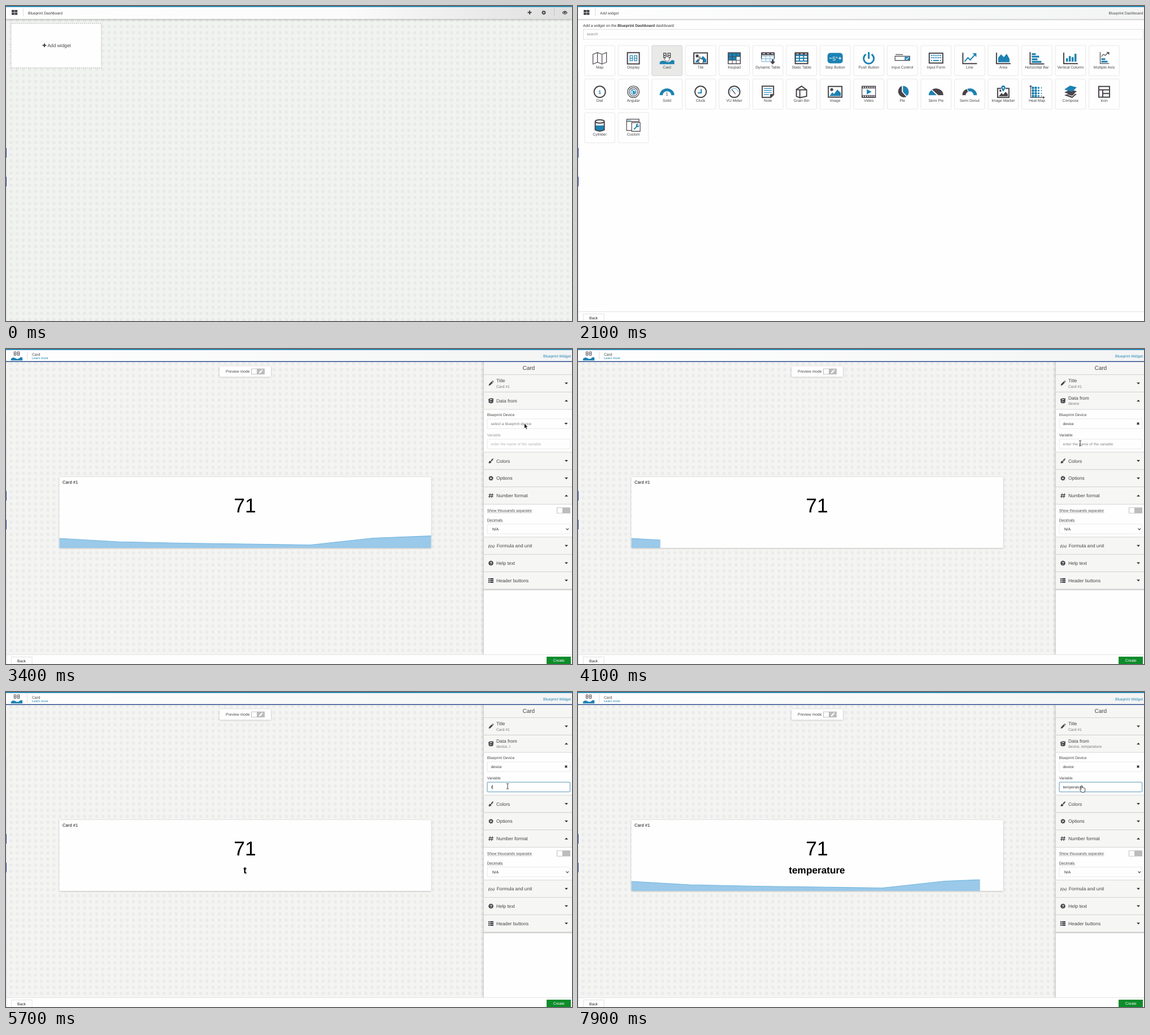
Animation of 1002x559 px, one loop 8 s. Source, as an HTML page:

```html
<!DOCTYPE html>
<html lang="en">
<head>
<meta charset="utf-8">
<title>Card widget</title>
<style>
html,body{margin:0;width:100%;height:100%;overflow:hidden;background:#f1f3f1}
svg{display:block;position:absolute;left:0;top:0}
text{font-family:"Liberation Sans",Arial,sans-serif;text-rendering:geometricPrecision;white-space:pre}
.k{fill:#48434a}.b{fill:#1c82b2}.w{fill:#fff}
.l,.m,.n,.h,.v{fill:none;stroke:#48434a;stroke-width:2}
.m{stroke:#1c82b2}.n{stroke:#1c82b2;stroke-width:1.2}.h{stroke-width:1.2}
.v{stroke:#fff;stroke-width:1.2}
</style>
</head>
<body>
<svg id="stage" width="1002" height="559" viewBox="0 0 1002 559"></svg>
<script>
const stage = document.getElementById('stage');
const INK = '#444', BLUE = '#1c82b2', WHITE = '#fefefe';

const text = (x, y, s, size = 6.7, fill = INK, more = '') =>
  `<text x="${x}" y="${y}" font-size="${size}" fill="${fill}" ${more}>${s}</text>`;
const rect = (x, y, w, h, fill, more = '') =>
  `<rect x="${x}" y="${y}" width="${w}" height="${h}" fill="${fill}" ${more}/>`;
const at = (x, y, s, k = 1) => `<g transform="translate(${x} ${y}) scale(${k})">${s}</g>`;
const group = (id, s) => `<g id="${id}">${s}</g>`;
const ring = (x, y, r) => `M${x - r} ${y}a${r} ${r} 0 1 0 ${2 * r} 0a${r} ${r} 0 1 0 ${-2 * r} 0z`;
const box = (x, y, w, h) => `M${x} ${y}h${w}v${h}h${-w}z`;
const repeat = (n, f) => Array.from({length: n}, (_, i) => f(i)).join('');
// "class path|class path" to SVG paths
const shape = s => s.split('|').map(p => `<path class="${p[0]}" d="${p.slice(1)}"/>`).join('');
const middle = 'text-anchor="middle"';

const eight = (x, y, w, h) => box(x, y, w, h) + `M${x} ${y + h / 2}h${w}`;
const axes = 'lM-12-10V9.5H13|';
const wave = 'bM-13 10.500V7C-9 3-6 4-2 6S5 7 7 4.500S11 4 13 4V10.500z';
const cardIcon = shape(`h${eight(-6, -9, 4.4, 8)}${eight(1.6, -9, 4.4, 8)}|${wave}`);
const photo = `l${box(-12, -9.5, 24, 19)}|k${ring(-6, -4, 2.6)}|bM-10 7.500L-5 1l3 3 6-8 6 6v5.500z`;
const dial = `l${ring(0, 0, 10)}`;
const one = (y, fill) => text(0, y, '1', 9, fill, middle + ' font-weight="bold"');
const arrowLine = 'mM-9 6L-3-1 1 3 10-7|bM5-9h7v7z';

const icons = [
  ['Map', shape('hM-12-7L-4-10 4-7 12-10V7L4 10.500-4 7-12 10.500zM-4-10V7M4-7V10.500')],
  ['Display', shape(`l${box(-10.5, -10, 21, 20)}|n${eight(-6, -4.5, 4.5, 9)}${eight(1.7, -4.5, 4.5, 9)}`)],
  ['Card', cardIcon],
  ['Tile', shape(photo)],
  ['Keypad', shape(`k${box(-11.5, -10.5, 23, 21)}|b${repeat(6, i => box(-10 + i % 3 * 7, -9 + (i / 3 | 0) * 6.5, 6, 5.5))}|w${box(4, -2.5, 6, 5.5)}${repeat(3, i => box(-10 + i * 7, 4, 6, 5))}`)],
  ['Dynamic Table', `<g opacity=".5">${shape(`n${repeat(3, i => box(-11 + i * 7.3, -4, 7.3, 5) + box(-11 + i * 7.3, 1, 7.3, 5))}`)}</g>` +
    shape(`k${box(-12, -10.5, 24, 5)}|hM-11.500-6V1M11.500-6V1|v${repeat(3, i => `M${-9 + i * 7.5}-8h4`)}|kM7 2h3v4h3L8.500 11 4 6h3z`)],
  ['Static Table', shape(`k${box(-12, -10.5, 24, 5)}|m${repeat(3, i => box(-11 + i * 7.3, -5, 7.3, 5) + box(-11 + i * 7.3, 0, 7.3, 5))}|l${box(-11, -9, 22, 18.5)}|v${repeat(3, i => `M${-9 + i * 7.3}-7.500h4`)}`)],
  ['Step Button', rect(-13.5, -9.5, 27, 18.5, BLUE, 'rx="5"') + shape('vM-10 0h4M6 0h5M8.500-2.500v5') + text(0, 4, '5°', 10, '#fff', middle)],
  ['Push Button', '<path class="m" stroke-width="3" style="stroke-width:3" d="M-5-7A9 9 0 1 0 5-7M0-11V1"/>'],
  ['Input Control', shape(`h${box(-13, -3.5, 26, 7.5)}M-12-6.500h13|b${box(4, -2.5, 9, 6)}|vM6 .5l2 2 3-4`)],
  ['Input Form', shape(`l${box(-12, -9, 24, 17.5)}|b${repeat(12, i => box(-9 + i % 6 * 3.2, -6 + (i / 6 | 0) * 4, 2, 2))}${box(-5, 3, 10, 2)}${box(-9, 3, 2, 2)}${box(7, 3, 2, 2)}`)],
  ['Line', shape(axes + arrowLine)],
  ['Area', shape(axes + 'bM-9 7V-1L-4-7 1-2 6-8 11 1V7z')],
  ['Horizontal Bar', shape(`lM-12-11V10H13|b${repeat(4, i => box(-9, -9 + i * 4.6, [7, 13, 10, 17][i], 3.3))}`)],
  ['Vertical Column', shape(axes + `b${repeat(4, i => box(-8 + i * 5, 6 - [6, 10, 8, 14][i], 3.5, [6, 10, 8, 14][i]))}`)],
  ['Multiple Axis', shape(`hM-7-11V9.500H9|b${box(-5, 0, 7, 3)}${box(-5, 4.5, 11, 3)}|hM-5-3L-1-7 2-5 7-10|kM4-11h5v5z`)],
  ['Dial', shape(dial) + one(3.4, BLUE)],
  ['Angular', shape(`h${ring(0, 0, 10.3)}${ring(0, 0, 7.5)}|n${ring(0, 0, 4.5)}|bM-5-6L2.500 1 1 2.500z|n${ring(1, 1, 2)}`)],
  ['Solid', shape('bM-13 6A13 12 0 0 1 13 6H7.500A7.500 7 0 0 0-7.500 6z') + text(0, 7, '1', 8, '#48434a', middle)],
  ['Clock', shape(`${dial}|mM1-5V2H-5`)],
  ['VU Meter', shape(`${dial}|hM-4-4L2 4`) + '<path class="n" stroke-dasharray="1.2 1" d="M-7 1A7 7 0 0 1 7 1"/>'],
  ['Note', shape(`lM-10-10H10V5L5 10H-10z|n${repeat(4, i => `M-7 ${-6 + i * 3.6}h${i > 2 ? 9 : 14}`)}|kM4 11V4h7z`)],
  ['Grain Bin', shape('lM-9-4V8L-3 10.500V-3.500zM-3-3.500H9V8L-3 10.500M-9-4L0-10 9-3.500')],
  ['Image', shape(photo)],
  ['Video', shape(`h${box(-12, -10, 24, 20)}|k${box(-12, -10, 24, 4)}${box(-12, 6, 24, 4)}|w${repeat(12, i => box(-10.5 + i % 6 * 3.8, i < 6 ? -9 : 7, 2, 2))}|bM-3.500-4.500L5 0-3.500 4.500z`)],
  ['Pie', shape('kM-1-10.500A10.500 10.500 0 1 0 7 9L-1 0z|bM1-10.500A10.500 10.500 0 0 1 8 7.500L1 0z')],
  ['Semi Pie', shape('kM-7-4A13 12 0 0 1 13 6H4z|bM-13 6A13 12 0 0 1-8-3L1 6z')],
  ['Semi Donut', shape('kM-13 6A13 12 0 0 1-5-5L-3 0A8 7 0 0 0-7 6z|bM-4-5.500A13 12 0 0 1 13 6H7A7 7 0 0 0-2-.5z')],
  ['Image Marker', shape(`l${box(-10, -6, 20, 16)}|kM-8 8L-3 2 0 5 4 0 8 4V8z${ring(-5, -2, 2)}|w${box(-4, -8, 8, 6)}|bM0 0L-3.500-6A3.800 3.800 0 1 1 3.500-6z|w${ring(0, -7, 1.3)}`)],
  ['Heat Map', shape(`hM-11-11V10H13M-13-9l2-2 2 2M11 8l2 2-2 2|b${repeat(16, i => ring(-7 + i % 4 * 5, -7 + (i / 4 | 0) * 4.8, [2.3, 2.3, 1.7, 1][i % 4]))}`)],
  ['Compose', shape('kM-11 6L0 2 11 4 3 11zM-11 1L0-4 11-1 3 6z|wM-11 3L3 7 11 0V1L3 8.500z|bM-11-4L-1-11 11-8 3 0z')],
  ['Icon', shape(`l${box(-9.5, -9.5, 19, 19)}M-9.500-3.500H9.500M-2.500-3.500V9.500M-2.500 3H9.500`)],
  ['Cylinder', shape('bM-8 0H8V8Q0 12-8 8z|lM-8-7V8Q0 12 8 8V-7M-8-7A8 2.800 0 1 1 8-7A8 2.800 0 1 1-8-7')],
  ['Custom', shape(`hM-12-11H10V-6M-12-11V9H-3M-12-7H10|n${repeat(3, i => `M${-10.5 + i * 2.4}-9h1.300`)}|h${box(-3, -5, 15, 15.5)}|mM1 7L7 1|b${ring(7.5, 0, 2.8)}|wM7-1l3-2 1 2-3 2z`)]
];

const gear = '<circle r="2.5" class="l"/><circle r="3.7" class="l" style="stroke-width:1.500" stroke-dasharray="1.45"/>';
const plus = shape('kM-1-3.500h2v2.500h2.500v2H1v2.500h-2V1h-2.500v-2H-1z');
const pencil = 'M-4 4l.7-2.800 4.600-4.600 2.100 2.100-4.600 4.600zM2-4l1-1 2.100 2.100-1 1z';
const caret = up => `<path fill="#333" d="${up ? 'M-3 1.500h6L0-1.800z' : 'M-3-1.500h6L0 1.800z'}"/>`;
const gridIcon = shape(`k${repeat(4, i => box(10 + i % 2 * 5.4, 7 + (i >> 1) * 4.8, 4.8, 4))}`);
const shade = (x, y, w, h, id) => rect(x, y, w, h, `url(#${id})`);
const sep = (x, y = 4, h = 14) => rect(x, y, .8, h, '#d4d4d4');

const fade = (id, a, b, dir = 'x2="0" y2="1"') =>
  `<linearGradient id="${id}" ${dir}><stop stop-color="${a}"/><stop offset="1" stop-color="${b}"/></linearGradient>`;
const tile = (id, c, hi) => `<pattern id="${id}" patternUnits="userSpaceOnUse" x="3.600" y="128.600" width="10.83" height="10.83">
  ${rect(2.8, 2.8, 5.2, 5.2, c, 'rx="1.200"')}<path d="M3.500 7.300l3.600-3.600" stroke="${hi}" stroke-width=".8"/></pattern>`;

const defs = `<defs>${fade('drop', '#0003', '#0000')}${fade('side', '#0000', '#0002', '')}
${tile('tileA', '#e7e9e6', '#eceeeb')}${tile('tileB', '#e9eae9', '#eeefee')}
<linearGradient id="barA"><stop stop-color="#fefefe"/><stop offset=".6" stop-color="#fbfbfb"/><stop offset="1" stop-color="#dedfde"/></linearGradient>
${fade('barB', '#fefefe', '#f3f4f4', '')}
<filter id="lift" x="-5%" y="-20%" width="110%" height="140%"><feDropShadow dx="0" dy=".6" stdDeviation="1.600" flood-opacity=".28"/></filter></defs>`;

const footer = rect(0, 542, 1002, 17, WHITE) + rect(0, 542, 1002, .8, '#dcdcdc') +
  rect(9.5, 546.5, 36.5, 14, WHITE, 'stroke="#ddd" stroke-width=".8"') + text(20, 555.5, 'Back', 6.7, '#222');

const dashboard = rect(0, 0, 1002, 559, '#f1f3f1') + rect(0, 23, 1002, 536, 'url(#tileA)') +
  rect(0, 2, 1002, 21, 'url(#barA)') + shade(0, 23, 1002, 4, 'drop') +
  gridIcon + sep(30) + text(39, 14.5, 'Blueprint Dashboard', 6.7, '#333') +
  at(927, 11.5, plus) + at(952, 11.7, gear, .85) + rect(970, 4, .8, 14, '#bbb') +
  at(989.3, 11.8, shape(`hM-4 0Q0-5.500 4 0Q0 5.500-4 0z|k${ring(0, -.2, 1.7)}`)) +
  rect(8.7, 30.7, 160, 79, WHITE, 'stroke="#bbb" stroke-width="1.500" stroke-dasharray="1.600 1.900"') +
  at(68, 69.7, plus, .95) + text(73.5, 72.8, 'Add widget', 8.4);

const picker = rect(0, 0, 1002, 559, WHITE) + rect(0, 2, 1002, 21, 'url(#barB)') + shade(0, 23, 1002, 3.5, 'drop') +
  gridIcon + sep(30) + text(39, 14.5, 'Add widget') + text(939.5, 14.5, 'Blueprint Dashboard') +
  text(9, 36.8, 'Add a widget on the <tspan font-weight="bold">Blueprint Dashboard</tspan> dashboard:', 6.7, '#333') +
  rect(9.4, 41.5, 991, 17.5, WHITE, 'id="search" stroke="#ddd" stroke-width=".9"') + text(15.5, 52.3, 'search', 6.7, '#888') +
  icons.map(([name, art], i) => {
    const x = 11.7 + i % 16 * 59.53, y = 70 + (i / 16 | 0) * 59.6;
    return rect(x, y, 53.6, 53.6, WHITE, `rx="1.500" stroke="#e2e2e2" stroke-width=".8" id="cell${i}"`) +
      at(x + 26.8, y + 22.7, art) + text(x + 26.8, y + 40.8, name, 6.7, INK, middle);
  }).join('') + footer;

const section = (y, name, open, icon, sub = '') =>
  rect(846, y, 156, 30.8, '#f6f6f5') + rect(846, y - .4, 156, .9, '#d2d2d2') + rect(846, y + 30.4, 156, .9, '#d2d2d2') +
  at(858.5, y + 15.5, icon) + at(992, y + 15.5, caret(open)) + sub +
  (name && text(868, y + (sub ? 13.4 : 18.5), name, 8.35));
const field = (y, id) => rect(852, y, 146.6, 17.2, WHITE, `id="${id}" rx="1" stroke="#e2e2e2" stroke-width=".8"`);
const solid = d => `<path class="k" d="${d}"/>`;

const panel = shade(841, 23, 5, 519, 'side') + rect(846, 23, 156, 519, WHITE) + rect(846, 23, 156, 22.5, '#f6f6f5') +
  text(925.3, 37.4, 'Card', 10, INK, middle) +
  section(45.5, 'Title', false, solid(pencil), text(868, 68.6, 'Card #1', 6.7, '#777')) +
  section(76.3, '', true, shape('lM-3-1V2.500Q0 4.500 3 2.500V-1|kM-4.500-3L0-4.500 4.500-4 4 1 1 2-4 0z|vM-2-1.500L2-2.500')) +
  text(868, 94.5, 'Data from', 8.35, INK, 'id="dataName"') + text(868, 99.4, '', 6.7, '#777', 'id="dataSub"') +
  text(851.7, 118.5, 'Blueprint Device') + field(124, 'device') + text(858.5, 134.8, '', 6.7, '#777', 'id="deviceText"') +
  at(991.5, 132.4, `<g id="deviceCaret">${caret(false)}</g>` + '<path id="deviceClear" d="M-1.800-1.800l3.600 3.600m0-3.600l-3.600 3.600" stroke="#222" stroke-width="1.500"/>') +
  text(851.7, 154.7, 'Variable', 6.7, INK, 'id="varLabel"') + field(160, 'variable') + text(858.5, 170.8, '', 6.7, INK, 'id="varText"') +
  rect(0, 165, .8, 7.4, '#111', 'id="caret"') +
  section(183, 'Colors', false, shape('kM-4 4Q-4 0-1 0L1 2Q0 5-4 4zM-.5-.8L3.500-4.500 4.500-3.500 1.500 1z')) +
  section(213.9, 'Options', false, at(0, 0, gear, .95)) +
  section(244.7, 'Number format', true, shape('hM-1.200-4L-2.700 4M2.700-4L1.200 4M-4-1.500H4.500M-4.500 1.500H4')) +
  text(851.7, 288.7, 'Show thousands separator') + rect(851.7, 290, 80, .5, '#888') +
  rect(975, 281.2, 24, 10.5, '#bcbcbc') + rect(976, 282, 9, 8.9, WHITE) +
  text(851.7, 305.5, 'Decimals') + rect(851.7, 306.8, 28.5, .5, '#888') +
  field(310.7, 'decimals') + text(861, 321.8, 'N/A', 6.7, '#222') + '<path class="h" d="M991.500 318.300l2.300 2.500 2.300-2.500"/>' +
  section(333.7, '', false, '') + text(853.5, 351.5, 'ƒ(x)', 7, INK, 'font-style="italic" font-weight="bold" style="font-family:\'Liberation Serif\',serif"') +
  text(868.7, 352.2, 'Formula and unit', 8.35) +
  section(364.5, 'Help text', false, solid(ring(0, 0, 4.3)) + text(0, 2.6, '?', 7.5, '#fff', middle + ' font-weight="bold"')) +
  section(395.3, 'Header buttons', false, shape(`k${repeat(3, i => box(-4.5, -4 + i * 3, 2, 2.2) + box(-1.7, -4 + i * 3, 6.2, 2.2))}`)) +
  shade(846, 426.3, 156, 3, 'drop');

const editor = rect(0, 0, 1002, 559, '#f4f5f3') + rect(0, 23, 846, 519, 'url(#tileB)') +
  rect(0, 2, 1002, 20, 'url(#barB)') + rect(0, 21.6, 1002, 1.4, '#1f4288') +
  at(19, 12, cardIcon, .78) + sep(37.3) + text(46, 11.5, 'Card') + text(46, 17.6, 'Learn more', 5.6, BLUE) +
  text(951, 14.6, 'Blueprint Widget', 6.7, BLUE) +
  rect(378, 30.7, 91, 18.4, WHITE, 'filter="url(#lift)"') + text(389, 42.2, 'Preview mode') +
  rect(434, 34.7, 24, 10.4, '#bcbcbc') + rect(435, 35.6, 9, 8.6, WHITE) + at(451, 40, `<path class="w" d="${pencil}"/>`, .8) +
  rect(94.5, 227.3, 658, 125.7, WHITE, 'filter="url(#lift)"') +
  '<clipPath id="reveal"><rect id="wipe" x="94.500" y="320" height="33"/></clipPath><g clip-path="url(#reveal)">' +
  '<path fill="#9ac9e9" d="M94 336L198 342 313 344.500 425 346 538 347.800 650 335.500 753 331.600V353H94z"/>' +
  '<path fill="none" stroke="#73b6df" stroke-width="1.100" d="M94 336L198 342 313 344.500 425 346 538 347.800 650 335.500 753 331.600"/></g>' +
  text(100, 239, 'Card #1', 7.7, '#111') + text(423, 290, '71', 35.5, '#000', middle) +
  text(423, 321.8, '', 17.2, '#000', middle + ' font-weight="bold" id="cardLabel"') + panel + footer +
  rect(957, 546, 43, 14, '#0d8c2b') + text(978.7, 555.4, 'Create', 6.7, '#fff', middle);

const handArt = '<path fill="#fff" stroke="#222" stroke-width=".9" stroke-linejoin="round" d="M-2.500 1V-5.500q1-1.400 2 0V-2q1.200-.9 1.900.2 1.200-.7 1.800.4 1.300-.4 1.500.9V2.500L3.500 6H-1.500L-4.700 1.500q.7-1.500 2.200-.5z"/>';
const cursors = group('arrow', '<path fill="#111" stroke="#fff" stroke-width=".7" d="M0 0V9.500L2.200 7.500 3.700 11 5.300 10.300 3.800 7H6.600z"/>') +
  group('hand', handArt) +
  group('ibeam', '<path fill="none" stroke="#222" stroke-width=".9" d="M-2-4.500Q0-4.500 0-3.500Q0-4.500 2-4.500M0-3.500V4M-2 5Q0 5 0 4Q0 5 2 5"/>');

stage.innerHTML = defs + group('blank', rect(0, 0, 1002, 559, '#f1f3f1') + '<circle id="dot" cx="504.800" cy="282.200" fill="#6d6e6d"/>' + shade(0, 2, 1002, 2, 'drop')) +
  group('dashboard', dashboard) + group('picker', picker) + group('editor', editor) +
  rect(0, 0, 1002, 1.8, BLUE) + rect(.6, 115, .8, 444, '#d9dbe0') +
  rect(0, 252, 1, 17, '#3348a8') + rect(0, 303, 1, 17, '#3348a8') +
  `<g id="trail" transform="translate(157 92)" opacity=".75">${handArt}</g>` + group('pointer', cursors);

const $ = id => document.getElementById(id);
const show = (id, on) => $(id).style.display = on ? '' : 'none';
const set = (id, key, v) => $(id).setAttribute(key, v);
const clamp = v => Math.min(1, Math.max(0, v));
const within = (t, ...spans) => spans.some(([a, b]) => t >= a && t < b);

// time, x, y
const path = [[200, 141, 20], [500, 126, 45], [1200, 126, 45], [1600, 157, 92], [1700, 157, 92], [2100, 217, 96], [2300, 217, 96],
  [2800, 804, 115], [3100, 880, 128], [3500, 930, 133], [3700, 930, 133], [4100, 889, 167], [4500, 888, 167], [7300, 888, 167], [7700, 893, 172], [8000, 893, 172]];
// time, characters typed
const typing = [[5700, 1], [6600, 3], [6700, 5], [6800, 7], [6900, 9], [7100, 11]];

const sine = u => (1 - Math.cos(Math.PI * u)) / 2;
function reveal(t) {
  if (t < 3800) return 1 - (1 - clamp((t - 2400) / 1000)) ** 2.2;
  const start = t < 5700 ? 3937 : t < 6600 ? 5730 : 7140;
  return sine(clamp((t - start) / 905));
}

function movePointer(t) {
  show('pointer', t >= 200);
  const i = path.findIndex(p => p[0] > t);
  if (i < 1) return;
  const [a, b] = [path[i - 1], path[i]], u = (t - a[0]) / (b[0] - a[0]);
  set('pointer', 'transform', `translate(${a[1] + (b[1] - a[1]) * u} ${a[2] + (b[2] - a[2]) * u})`);
  const kind = within(t, [1500, 2300], [7500, 8000]) ? 'hand' : within(t, [4000, 7500]) ? 'ibeam' : 'arrow';
  for (const k of ['arrow', 'hand', 'ibeam']) show(k, k === kind);
}

function drawEditor(t) {
  const picked = t >= 3800;
  const word = 'temperature'.slice(0, typing.reduce((n, [at, c]) => t >= at ? c : n, 0));
  const outline = (id, on) => set(id, 'stroke', on ? '#2f7ba6' : '#e2e2e2');
  set('wipe', 'width', 658 * reveal(t));
  set('dataName', 'y', picked ? 90 : 94.5);
  $('dataSub').textContent = picked ? 'device' + (word && ', ' + word) : '';
  $('deviceText').textContent = picked ? 'device' : 'select a blueprint device';
  set('deviceText', 'fill', picked ? '#333' : '#777');
  show('deviceCaret', !picked);
  show('deviceClear', picked);
  outline('device', within(t, [3500, 3800]));
  outline('variable', t >= 4500);
  set('varLabel', 'fill', picked ? INK : '#999');
  $('varText').textContent = word || 'enter the name of the variable';
  set('varText', 'fill', word ? '#333' : picked ? '#858585' : '#b4b4b4');
  $('cardLabel').textContent = word;
  show('caret', within(t, [4500, 4900], [5400, 6200], [6600, 7600]));
  set('caret', 'x', 858.9 + (word ? $('varText').getComputedTextLength() : 0));
}

function draw(t) {
  show('dashboard', t < 500);
  show('blank', within(t, [500, 1200]));
  show('picker', within(t, [1200, 2300]));
  show('editor', t >= 2300);
  show('trail', within(t, [1800, 2300]));
  set('dot', 'r', t < 800 ? 0 : 3.6 * Math.sin(clamp((t - 700) / 300) * Math.PI / 2));
  set('search', 'stroke', t < 1900 ? '#2f7ba6' : '#ddd');
  set('cell2', 'fill', t >= 1500 ? '#e9e9e8' : WHITE);
  set('cell2', 'stroke', t >= 1500 ? '#ccc' : '#e2e2e2');
  if (t >= 2300) drawEditor(t);
  movePointer(t);
}

const begin = performance.now();
function tick() {
  draw(Math.floor((performance.now() - begin) % 8000 / 100) * 100);
  requestAnimationFrame(tick);
}
tick();
</script>
</body>
</html>
```
